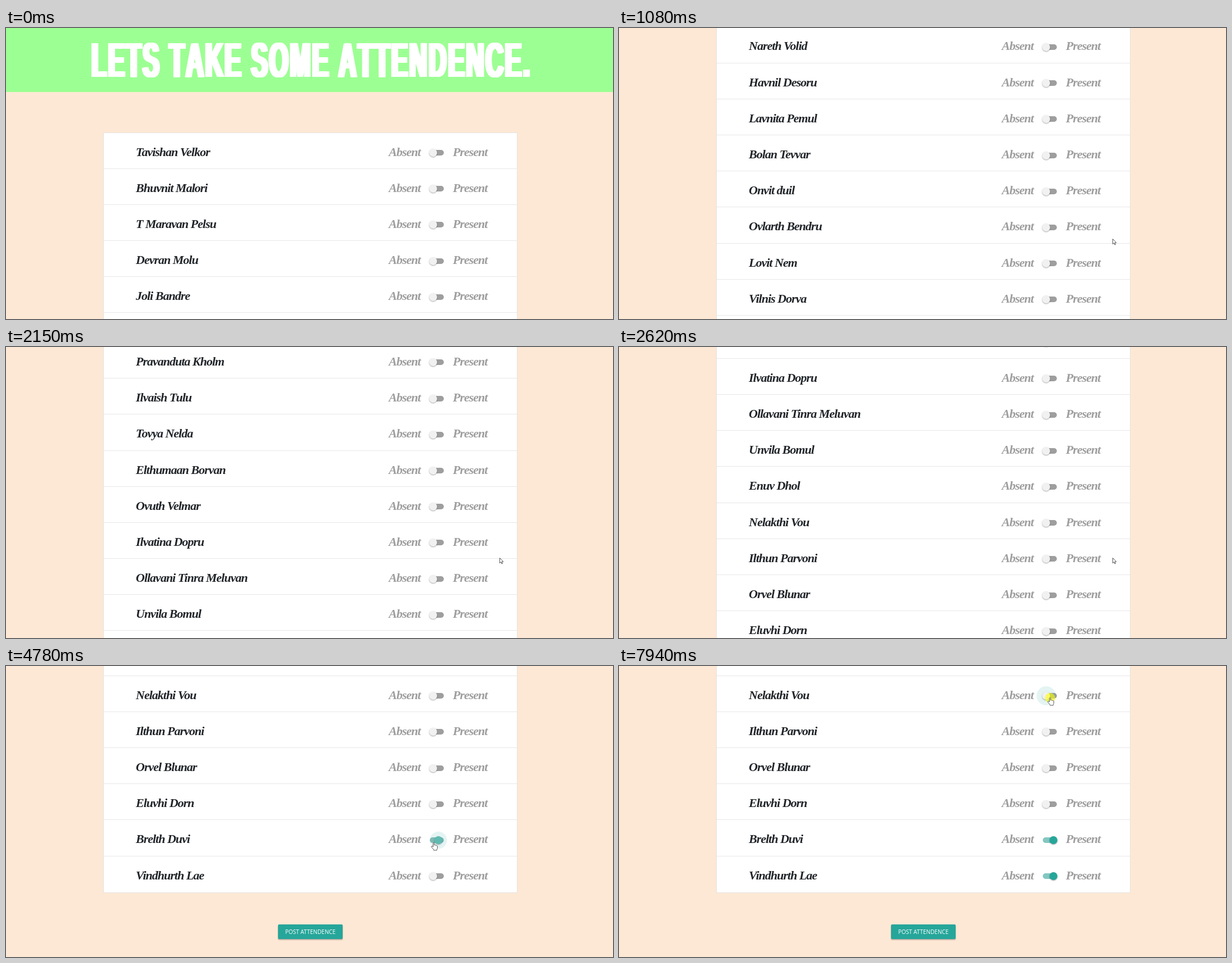
These frames come from a looping animation (1080 px wide and 518 px high, 8 s). An HTML page:

```html
<!DOCTYPE html>
<html lang="en">
<head>
<meta charset="utf-8">
<title>Attendance</title>
<style>
* { box-sizing: border-box; }
html, body { margin: 0; width: 100%; height: 100%; overflow: hidden; }
#stage { position: relative; width: 1080px; height: 518px; overflow: hidden; background: #fde8d5; }
#page { position: absolute; inset: 0 0 auto; height: 2100px; }
header { height: 113.5px; background: #9cff93; }
h1 {
  position: absolute; left: 152px; top: 13px; margin: 0; white-space: pre; color: #fff;
  font: bold 88px/88px "Liberation Sans", Arial, sans-serif;
  font-kerning: none; letter-spacing: 5.5px;
  transform: scaleX(.5); transform-origin: 0 0;
  text-shadow: 6px 0, -6px 0, 3px 0, -3px 0;
}
#list {
  position: absolute; left: 173px; top: 185.5px; width: 737px;
  background: #fff; border: 1px solid #e6e3e0;
  font: italic bold 22px/64px "Liberation Serif", "Times New Roman", serif;
  letter-spacing: -1px; color: #212529; white-space: pre;
}
.row { position: relative; height: 64.2px; border-bottom: 1px solid #e8e8e8; }
.row:last-child { border: 0; }
.row > * { position: absolute; top: 2px; }
.name { left: 57px; }
.absent { left: 507px; color: #9e9e9e; }
.present { left: 621px; color: #9e9e9e; }
.row .track { left: 579.5px; top: 30.5px; width: 25.5px; height: 10px; border-radius: 5px; }
.knob { position: absolute; left: -.5px; top: -2px; width: 14px; height: 14px; border-radius: 50%; }
#post {
  position: absolute; left: 484px; top: 2041px; width: 115px; height: 26px; border-radius: 2px;
  background: #26a69a; color: #fff; text-align: center;
  font: 10px/26px "Open Sans", "Noto Sans", sans-serif;
  box-shadow: 0 1px 2px rgba(0,0,0,.2), 0 2px 2px rgba(0,0,0,.14);
}
#pointer { position: absolute; left: 0; top: 0; overflow: visible; }
#pointer path { fill: #fff; stroke: #444; stroke-width: .9; stroke-linejoin: round; }
</style>
</head>
<body>
<div id="stage">
  <div id="page">
    <header><h1>LETS TAKE SOME ATTENDENCE.</h1></header>
    <div id="list"></div>
    <div id="post">POST ATTENDENCE</div>
  </div>
  <svg id="pointer" width="1" height="1">
    <circle id="glow" cy="1" r="9" fill="#ff0" fill-opacity=".6"/>
    <path id="arrow" d="M.5.5v9.2l2.1-2 1.5 3.3 1.4-.6-1.5-3.2h2.9z"/>
    <path id="hand" d="M-1 8V1.6C-1 .2 1 .2 1 1.6V5c.6-.7 1.7-.5 2 .3.7-.5 1.6-.2 1.9.5.8-.4 1.7.1 1.7 1V10c0 1-1 2-1 4H0C0 12-3 10-4 8c-.5-1.2.8-1.9 1.6-1.2z"/>
  </svg>
</div>
<script>
const LOOP = 8000, STEP = 77, ROW = 64.2, SWITCH_X = 766, SWITCH_Y = 222;
const names = `Tavishan Velkor,Bhuvnit Malori,T Maravan Pelsu,Devran Molu,Joli Bandre,
Nareth Volid,Havnil Desoru,Lavnita Pemul,Bolan Tevvar,Onvit duil,Ovlarth Bendru,Lovit Nem,Vilnis Dorva,
Pravanduta Kholm,Ilvaish Tulu,Tovya Nelda,Elthumaan Borvan,Ovuth Velmar,Ilvatina Dopru,
Ollavani Tinra Meluvan,Unvila Bomul,Enuv Dhol,Nelakthi Vou,Ilthun Parvoni,Orvel Blunar,
Eluvhi Dorn,Brelth Duvi,Vindhurth Lae`.split(',').map(s => s.trim());

const $ = id => document.getElementById(id);
const ramp = (t, a, b) => Math.min(1, Math.max(0, (t - a) / (b - a)));
const easeOut = (p, power) => 1 - (1 - p) ** power;
const mix = (a, b, p) => `rgb(${a.map((v, i) => v + (b[i] - v) * p)})`;
const show = (el, on) => el.style.display = on ? '' : 'none';

// Three wheel gestures at a regular interval, each slowing down
const scrollAt = t => [701, 343, 537].reduce((sum, distance, i) => {
  const start = 616 + 847 * i;
  return sum + distance * easeOut(ramp(t, start, start + 780), 1.442);
}, 0);

// Pointer moves: start, end, x, y
const moves = [
  [150, 308, 878, 375], [3465, 3542, 821, 356], [3542, 4235, 761, 314],
  [4850, 5460, 766, 381], [6010, 6160, 761, 371], [6650, 7400, 767, 56]
];
const pointerAt = t => moves.reduce(([x, y], [start, end, toX, toY]) => {
  const p = easeOut(ramp(t, start, end), 2);
  return [x + (toX - x) * p, y + (toY - y) * p];
}, [984, 473]);

// Index of the row whose switch is under the pointer, or -1
function hoveredRow(t) {
  const [x, y] = pointerAt(t), pos = (y + scrollAt(t) - SWITCH_Y) / ROW, row = Math.round(pos);
  return Math.abs(x - SWITCH_X) < 14 && Math.abs(pos - row) * ROW < 6 ? row : -1;
}

const clicks = [[4450, 4630], [5690, 6100], [6385, 6560], [7840, 9000]]
  .map(([press, release]) => ({ press, release, row: hoveredRow(press) }));

$('list').innerHTML = names.map(name =>
  `<div class="row"><span class="name">${name}</span><span class="absent">Absent</span>` +
  '<div class="track"><div class="knob"></div></div><span class="present">Present</span></div>').join('');
const tracks = [...document.querySelectorAll('.track')];

function setSwitch(track, on, ripple) {
  const knob = track.firstChild.style;
  track.style.background = mix([158, 158, 158], [132, 199, 193], on);
  knob.background = mix([241, 241, 241], [38, 166, 154], on);
  knob.transform = `translateX(${13 * on}px)`;
  knob.boxShadow = '0 1px 2px rgba(0,0,0,.25), 0 1px 3px rgba(0,0,0,.12), ' +
    `0 0 0 ${10 * ripple}px rgba(38,166,154,.12)`;
}

function draw(t) {
  $('page').style.transform = `translateY(${-Math.round(scrollAt(t))}px)`;

  for (const { press, release, row } of clicks)
    if (row >= 0) setSwitch(tracks[row], ramp(t, release, release + 200),
      ramp(t, press, press + 90) * (1 - ramp(t, release + 100, release + 350)));

  const [x, y] = pointerAt(t), hand = hoveredRow(t) >= 0;
  $('pointer').style.transform = `translate(${x}px, ${y}px)`;
  show($('pointer'), t >= 150);
  show($('arrow'), !hand);
  show($('hand'), hand);
  show($('glow'), clicks.some(c => t >= c.press && t < c.release));
}

tracks.forEach(track => setSwitch(track, 0, 0));
const start = performance.now();
(function tick() {
  const t = (performance.now() - start) % LOOP;
  draw(Math.floor((t + 12) / STEP) * STEP);
  requestAnimationFrame(tick);
})();
</script>
</body>
</html>
```
